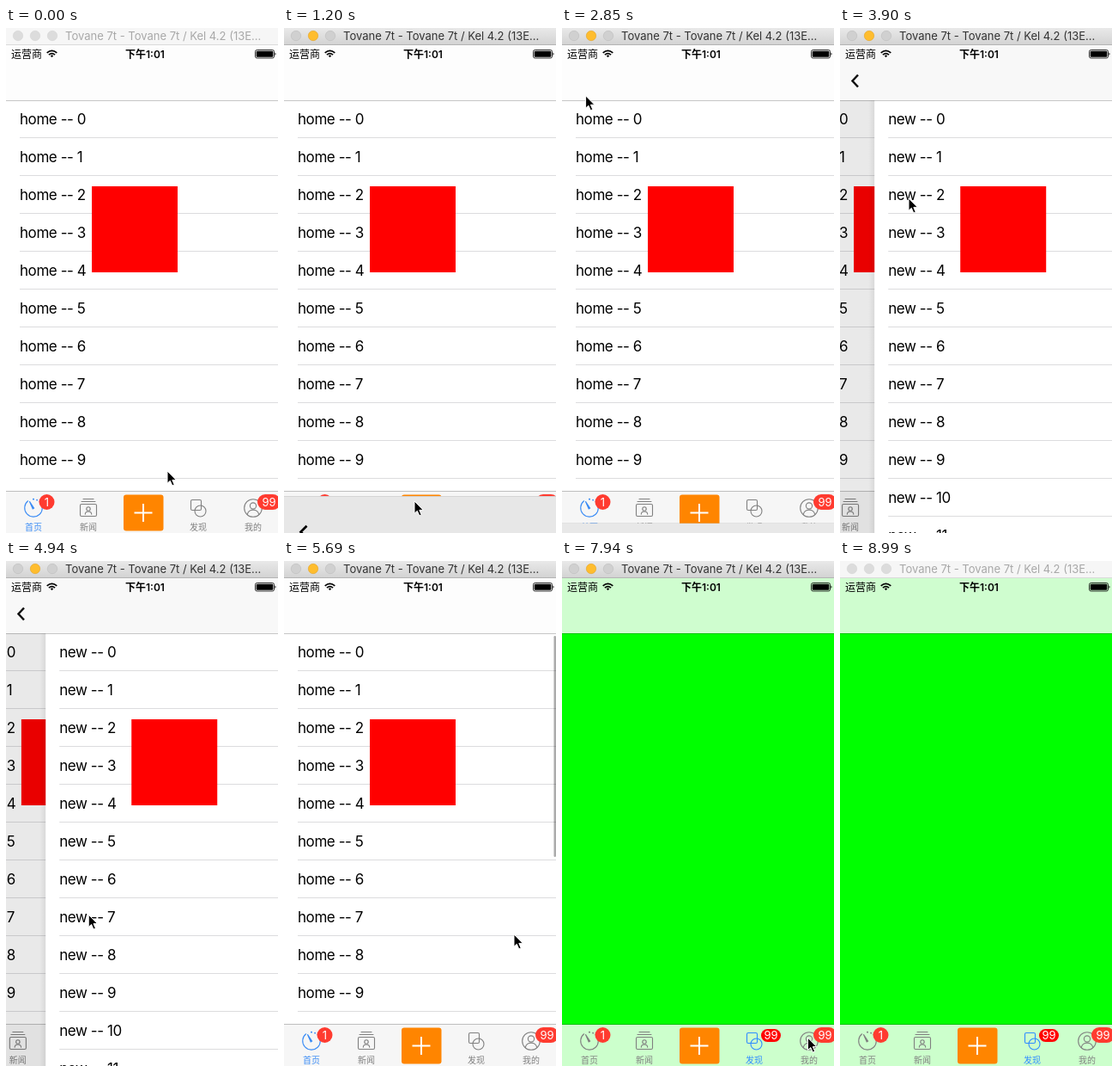
These frames come from a looping animation (317x587 px, 9.09 s). An HTML page:

```html
<!DOCTYPE html>
<html lang="zh-CN">
<head>
<meta charset="utf-8">
<title>Tab bar demo</title>
<style>
html, body { margin: 0; width: 100%; height: 100%; overflow: hidden; background: #fff; }
svg { display: block; width: 317px; height: 587px; }
text { font-family: Inter, "Noto Sans CJK SC", "Noto Sans CJK", sans-serif; }
.row { font-size: 17px; letter-spacing: -.43px; }
.tab { color: #808080; }
.tab text { font-size: 10px; text-anchor: middle; fill: currentColor; }
.tab .icon { fill: none; stroke: currentColor; stroke-width: 1.1; stroke-linecap: round; }
.badge { font-size: 13px; fill: #fff; text-anchor: middle; }
</style>
</head>
<body>
<svg viewBox="0 0 317 587">
  <defs>
    <linearGradient id="metal" x2="0" y2="1">
      <stop stop-color="#e9e9e9"/><stop offset="1" stop-color="#d2d2d2"/>
    </linearGradient>
    <linearGradient id="shade">
      <stop stop-color="#000" stop-opacity="0"/><stop offset="1" stop-color="#000" stop-opacity=".07"/>
    </linearGradient>
  </defs>

  <g id="home">
    <rect y="20" width="320" height="567" fill="#fff"/>
    <g id="homeRows"></g>
    <rect x="100" y="184" width="100" height="100" fill="#f00"/>
    <rect id="homeBar" x="314.5" y="87" width="2.5" height="257" rx="1.2" fill="#000"/>
    <rect id="green" y="84" width="320" height="503" fill="#0f0"/>
    <rect id="tabBg" y="539" width="320" height="48"/>
    <rect y="538" width="320" height="1" fill="#000" fill-opacity=".25"/>
    <g class="tab" id="tabHome">
      <g class="icon">
        <path d="M39 550.3A10.3 10.3 0 1 1 25.6 549.8"/>
        <path d="M31.8 547.7h.4M36 548.6l.3 .1" stroke-width="1.7"/>
        <path d="M27.4 550.2L32.6 558L31.2 558.9Z" fill="currentColor"/>
      </g>
      <text x="32" y="584">首页</text>
    </g>
    <g class="tab">
      <g class="icon">
        <rect x="86.5" y="553.5" width="19" height="14" rx="1.5"/>
        <path d="M88 550.5H104M90 547.5H102M92.3 565.3C92.3 560.8 99.7 560.8 99.7 565.3"/>
        <circle cx="96" cy="559" r="2.2"/>
      </g>
      <text x="96" y="584">新闻</text>
    </g>
    <rect x="137" y="542.5" width="46.500" height="42" rx="3" fill="#ff8500"/>
    <path d="M149.500 563.5H170.500M160 553V574" stroke="#fff" stroke-width="2"/>
    <g class="tab" id="tabFind">
      <g class="icon">
        <rect x="215.500" y="548.500" width="12" height="12" rx="1.500"/>
        <circle cx="226.500" cy="561.500" r="6.500"/>
      </g>
      <text x="224" y="584">发现</text>
    </g>
    <g class="tab">
      <g class="icon">
        <circle cx="288" cy="558" r="10.300"/>
        <circle cx="288" cy="555.500" r="3.600"/>
        <path d="M281.300 565.500C282.500 558.500 293.500 558.500 294.700 565.500"/>
      </g>
      <text x="288" y="584">我的</text>
    </g>
    <circle cx="47.500" cy="551" r="9" fill="#ff3b30"/>
    <text class="badge" x="47.500" y="555.700">1</text>
    <rect x="293" y="542" width="27" height="18" rx="9" fill="#ff3b30"/>
    <text class="badge" x="306.500" y="555.700">99</text>
    <g id="findBadge">
      <rect x="232" y="544" width="23" height="15" rx="7.500" fill="#f00"/>
      <text class="badge" x="243.500" y="556">99</text>
    </g>
  </g>
  <rect id="dim" y="20" width="317" height="567"/>

  <g id="news">
    <rect x="-7" y="84" width="7" height="503" fill="url(#shade)"/>
    <rect y="84" width="320" height="503" fill="#fff"/>
    <g id="newsRows"></g>
    <rect x="100" y="184" width="100" height="100" fill="#f00"/>
    <rect id="newsBar" x="314.500" y="87" width="2.500" height="285" rx="1.200" fill="#000"/>
  </g>

  <rect id="nav" y="20" width="317" height="64"/>
  <rect y="84" width="317" height="1" fill="#000" fill-opacity=".22"/>
  <path id="back" d="M21 54.500L14.500 61.500L21 68.500" fill="none" stroke="#111" stroke-width="2.500"/>

  <g id="modal">
    <rect y="20" width="317" height="567" fill="#808080"/>
    <rect id="modalNav" y="20" width="317" height="64"/>
    <rect y="84" width="317" height="1" fill="#6e6e6e"/>
    <path d="M26.500 54.500L19.500 61.500L26.500 68.500" fill="none" stroke="#000" stroke-width="2.700"/>
  </g>

  <g id="status">
    <text x="6" y="34.500" font-size="12">运营商</text>
    <g fill="none" stroke="#000" stroke-width="1.700">
      <path d="M47.700 28.900Q53.500 23.700 59.300 28.900M49.900 31.100Q53.500 28 57.100 31.100"/>
      <path d="M51.700 32.100Q53.500 30.900 55.300 32.100L53.500 34.200Z" fill="#000" stroke="none"/>
    </g>
    <text x="162" y="34.500" font-size="12" font-weight="600" text-anchor="middle">下午1:01</text>
    <rect x="290.500" y="25.500" width="22" height="9.500" rx="2" fill="none" stroke="#000" stroke-width=".8"/>
    <rect x="291.700" y="26.700" width="19.600" height="7.100" rx="1"/>
    <path d="M313.500 28.500Q315.500 30.200 313.500 32Z"/>
  </g>

  <g id="titleBar">
    <rect id="titleBg" width="317" height="20"/>
    <rect id="titleEdge" y="19" width="317" height="1"/>
    <circle class="dot" cx="14" cy="9" r="5.700"/>
    <circle class="dot" cx="34" cy="9" r="5.700"/>
    <circle class="dot" cx="54" cy="9" r="5.700"/>
    <text id="title" x="69" y="14" font-size="13">Tovane 7t - Tovane 7t / Kel 4.2 (13E...</text>
  </g>

  <path id="cursor" d="M0 0V14.300L3.300 11.300L5.800 16.900L8.200 15.900L5.800 10.400H10.300Z" stroke="#fff" stroke-width="1"/>
</svg>

<script>
const LOOP = 9090;
const $ = id => document.getElementById(id);
const set = (id, attrs) => {
  for (const k in attrs) $(id).setAttribute(k, attrs[k]);
};
const clamp = v => Math.max(0, Math.min(1, v));
const mix = (a, b, p) => a + (b - a) * p;
const gray = v => `rgb(${v},${v},${v})`;
const show = (id, on) => set(id, { visibility: on ? 'visible' : 'hidden' });
const shift = (id, x, y) => set(id, { transform: `translate(${x.toFixed(2)} ${y.toFixed(2)})` });

function rows(id, label, count) {
  let out = '';
  for (let i = 0; i < count; i++) {
    const y = 84 + 44 * i;
    out += `<text class="row" x="16" y="${y + 28}">${label} -- ${i}</text>` +
      `<rect x="16" y="${y + 43}" width="304" height="1" fill="#dcdcde"/>`;
  }
  $(id).innerHTML = out;
}
rows('homeRows', 'home', 11);
rows('newsRows', 'new', 12);

// Critically damped spring: the share of the distance still to go.
function rest(t, start) {
  const u = Math.max(0, t - start) * 0.018;
  return (1 + u) * Math.exp(-u);
}

// Scroll indicator that appears at once and fades away.
const flash = (t, start) => t < start ? 0 : 0.33 * (1 - clamp((t - start - 600) / 350));

const path = [ // time, x, y
  [0, 188, 515], [150, 153, 552], [300, 153, 552], [750, 152, 550],
  [1200, 152, 550], [1950, 31, 66], [2250, 21.500, 65], [2700, 21.500, 65],
  [3450, 80, 198], [4200, 80, 198], [4640, 50, 400], [4750, 50, 405],
  [5390, 268, 434], [5690, 268, 434], [6590, 226, 552], [6740, 228, 551],
  [7190, 228, 551], [8240, 301, 555], [8390, 302, 554]
];
function pointer(t) {
  const i = path.findIndex(k => k[0] > t);
  if (i < 0) return path[path.length - 1].slice(1);
  const [a, b] = [path[i - 1], path[i]];
  const p = (t - a[0]) / (b[0] - a[0]);
  const e = p * p * (3 - 2 * p);
  return [mix(a[1], b[1], e), mix(a[2], b[2], e)];
}

// Left edge of the pushed page: push, follow the drag, then let go.
function pageX(t) {
  if (t < 3700) return 320;
  if (t < 4700) return 320 * rest(t, 3700);
  if (t < 5390) return Math.max(0, pointer(t)[0] - 50);
  return 320 - 102 * rest(t, 5290);
}

function modalY(t) {
  if (t < 1175) return 567;
  return t < 2525 ? 567 * rest(t, 1175) : 567 * (1 - rest(t, 2525));
}

function draw(t) {
  const active = t >= 1050 && t < 8990;
  set('titleBg', { fill: active ? 'url(#metal)' : '#f6f6f6' });
  set('titleEdge', { fill: active ? '#b4b4b4' : '#dadada' });
  set('title', { fill: active ? '#333' : '#a8a8a8' });
  document.querySelectorAll('.dot').forEach((dot, i) => {
    const lit = active && i === 1;
    dot.setAttribute('fill', lit ? '#ffbd2e' : active ? '#d0d0d0' : '#dcdcdc');
    dot.setAttribute('stroke', lit ? '#e2a325' : active ? '#bdbdbd' : '#d3d3d3');
    dot.setAttribute('stroke-width', 0.600);
  });

  const found = t >= 6890;
  show('green', found);
  show('findBadge', found);
  $('tabHome').style.color = found ? '' : '#3b8cf5';
  $('tabFind').style.color = found ? '#2f8cff' : '';
  set('tabBg', { fill: !found ? '#f6f6f6' : t < 7040 ? '#b0ffb0' : '#ccffcc' });

  const x = pageX(t);
  const cover = clamp(1 - x / 320);
  const pushed = t >= 3700 && t < 5690 && x < 319.500;
  show('news', pushed);
  shift('news', x, 0);
  shift('home', pushed ? -96 * cover : 0, 0);
  set('dim', { 'fill-opacity': pushed ? 0.1 * cover : 0 });
  set('back', { opacity: pushed ? clamp(cover * 1.200) : 0 });
  set('nav', { fill: found ? '#cffdcf' : pushed ? '#f8f8f8' : '#fdfdfd' });
  set('homeBar', { 'fill-opacity': t < 4000 ? flash(t, 3000) : flash(t, 5640) });
  set('newsBar', { 'fill-opacity': flash(t, 4200) });

  const y = modalY(t);
  show('modal', y < 566);
  shift('modal', 0, y);
  set('modalNav', { fill: gray(Math.round(mix(222, 232, y / 567))) });

  show('cursor', t < 8540);
  shift('cursor', ...pointer(t));
}

const step = t => t < 4490 ? Math.min(Math.floor(t / 150) * 150, 4350)
  : Math.floor((t + 10) / 150) * 150 - 10;

const begin = performance.now();
function tick() {
  draw(step((performance.now() - begin) % LOOP));
  requestAnimationFrame(tick);
}
tick();
</script>
</body>
</html>
```
